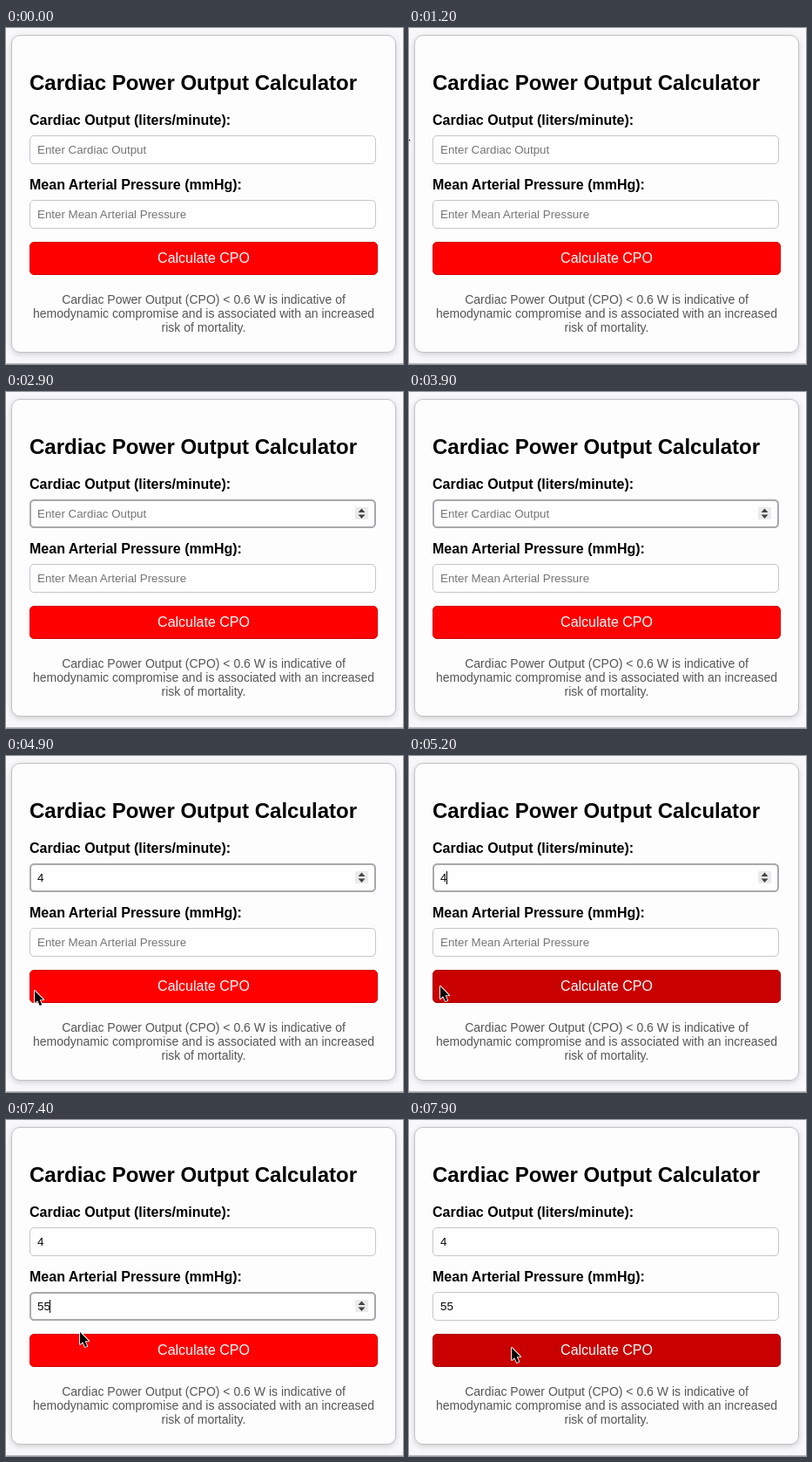
These frames come from a looping animation (456x385 px, 8000 ms). An HTML page:

```html
<!DOCTYPE html>
<html lang="en">
<head>
<meta charset="utf-8">
<title>Cardiac Power Output Calculator</title>
<style>
html, body { margin: 0; width: 100%; height: 100%; overflow: hidden; background: #f8f7f9; }
svg { display: block; width: 456px; height: 385px; font-family: "Liberation Sans", Arial, sans-serif; }

.card { fill: #fefdfe; stroke: #c2c1c6; filter: drop-shadow(0 2px 3px rgba(0, 0, 0, .16)); }
.title { font: bold 24px "Liberation Sans", Arial, sans-serif; }
.label { font: bold 16px "Liberation Sans", Arial, sans-serif; }
.entry { font-size: 13.333px; }
.hint { fill: #757575; }
.note { font-size: 14px; fill: #555; text-anchor: middle; }
.action { font-size: 16px; fill: #fff; text-anchor: middle; }
.box { fill: #fefefe; stroke: #c6c5cb; }
.ring { fill: none; stroke: #a9a8ad; stroke-width: 2; }

.anim { animation: 8s step-end infinite; }
.off { opacity: 0; }

/* 1.25% is 100 ms */
#button { fill: #fe0000; stroke: #d00000; animation-name: hover; }
@keyframes hover {
  0%, 67.5% { fill: #fe0000; stroke: #d00000; }
  62.5%, 96.25% { fill: #c90000; stroke: #a80000; }
  66.25%, 95% { fill: #da0000; stroke: #b40000; }
  93.75% { fill: #ee0000; stroke: #c40000; }
}
#hint1 { animation-name: hint1; }
@keyframes hint1 { 0% { opacity: 1; } 52.5%, 100% { opacity: 0; } }
#value1 { animation-name: value1; }
@keyframes value1 { 0% { opacity: 0; } 52.5%, 100% { opacity: 1; } }
#hint2 { animation-name: hint2; }
@keyframes hint2 { 0% { opacity: 1; } 86.25%, 100% { opacity: 0; } }
#digit1 { animation-name: digit1; }
@keyframes digit1 { 0% { opacity: 0; } 86.25%, 100% { opacity: 1; } }
#digit2 { animation-name: digit2; }
@keyframes digit2 { 0% { opacity: 0; } 88.75%, 100% { opacity: 1; } }
#ring1 { animation-name: ring1; }
@keyframes ring1 { 0%, 70%, 100% { opacity: 0; } 30% { opacity: 1; } }
#ring2 { animation-name: ring2; }
@keyframes ring2 { 0%, 97.5%, 100% { opacity: 0; } 70% { opacity: 1; } }
#spin1 { animation-name: spin1; }
@keyframes spin1 { 0%, 70%, 100% { opacity: 0; } 26.25% { opacity: 1; } }
#spin2 { animation-name: spin2; }
@keyframes spin2 { 0%, 97.5%, 100% { opacity: 0; } 67.5% { opacity: 1; } }

#caret { animation-name: blink, type; }
@keyframes blink {
  0%, 36.25%, 48.75%, 58.75%, 76.25%, 95%, 100% { opacity: 0; }
  30%, 42.5%, 52.5%, 65%, 70%, 82.5%, 86.25%, 88.75% { opacity: 1; }
}
@keyframes type {
  0% { transform: translate(36px, 132px); }
  52.5% { transform: translate(43px, 132px); }
  70% { transform: translate(36px, 206px); }
  86.25% { transform: translate(43px, 206px); }
  88.75%, 100% { transform: translate(50px, 206px); }
}

#pointer { animation-name: show, move; }
@keyframes show {
  0%, 36.25%, 86.25% { opacity: 0; }
  15%, 61.25%, 92.5%, 100% { opacity: 1; }
}
@keyframes move {
  0% { transform: translate(-8px, 119px); }
  16.25% { transform: translate(20px, 129px); }
  17.5% { transform: translate(40px, 135px); }
  18.75% { transform: translate(47px, 136px); }
  26.25% { transform: translate(56px, 137px); }
  27.5% { transform: translate(63px, 138px); }
  33.75% { transform: translate(48px, 138px); }
  35% { transform: translate(28px, 138px); }
  61.25% { transform: translate(33px, 269px); }
  62.5% { transform: translate(34px, 278px); }
  65% { transform: translate(36px, 264px); }
  66.25% { transform: translate(39px, 240px); }
  67.5% { transform: translate(41px, 222px); }
  68.75% { transform: translate(42px, 213px); }
  70% { transform: translate(43px, 210px); }
  92.5% { transform: translate(85px, 243px); }
  93.75% { transform: translate(97px, 250px); }
  95% { transform: translate(107px, 256px); }
  96.25% { transform: translate(114px, 259px); }
  97.5%, 100% { transform: translate(118px, 261px); }
}
</style>
</head>
<body>
<svg viewBox="0 0 456 385">
  <defs>
    <rect id="field" x="27.5" y="123.5" width="397" height="32" rx="4.5"/>
    <rect id="focus" x="28" y="124" width="396" height="31" rx="4.5"/>
    <g id="spinner">
      <rect x="401" y="132" width="15" height="14" rx="1" fill="#ebebeb"/>
      <path d="M404.5 138l4-4.5 4 4.5zM404.5 140.5l4 4.5 4-4.5z" fill="#444"/>
    </g>
  </defs>

  <rect y="384" width="456" height="1" fill="#b9b8bc"/>
  <rect class="card" x="6.5" y="8.5" width="441" height="363" rx="9.5"/>
  <text class="title" x="27" y="71">Cardiac Power Output Calculator</text>

  <text class="label" x="27" y="111">Cardiac Output (liters/minute):</text>
  <use href="#field" class="box"/>
  <use href="#focus" id="ring1" class="ring anim off"/>
  <text id="hint1" class="entry hint anim" x="36" y="144">Enter Cardiac Output</text>
  <text id="value1" class="entry anim off" x="36" y="144">4</text>
  <use href="#spinner" id="spin1" class="anim off"/>

  <text class="label" x="27" y="185">Mean Arterial Pressure (mmHg):</text>
  <g transform="translate(0 74)">
    <use href="#field" class="box"/>
    <use href="#focus" id="ring2" class="ring anim off"/>
    <text id="hint2" class="entry hint anim" x="36" y="144">Enter Mean Arterial Pressure</text>
    <text class="entry" x="36" y="144"><tspan></tspan></text>
    <text id="digit1" class="entry anim off" x="36" y="144">5</text>
    <text id="digit2" class="entry anim off" x="43.4" y="144">5</text>
    <use href="#spinner" id="spin2" class="anim off"/>
  </g>

  <rect id="button" class="anim" x="27.5" y="245.5" width="399" height="37" rx="4.5"/>
  <text class="action" x="227" y="269">Calculate CPO</text>

  <g class="note">
    <text x="227" y="316">Cardiac Power Output (CPO) &lt; 0.6 W is indicative of</text>
    <text x="227" y="332">hemodynamic compromise and is associated with an increased</text>
    <text x="227" y="348">risk of mortality.</text>
  </g>

  <rect id="caret" class="anim off" width="1" height="15"/>
  <path id="pointer" class="anim off" d="M0 0V14L3.2 11.2 5.8 17 8.2 16 5.7 10.2H10Z"
    stroke="#fff" stroke-width="1.8" stroke-linejoin="round" paint-order="stroke"/>
</svg>
</body>
</html>
```
